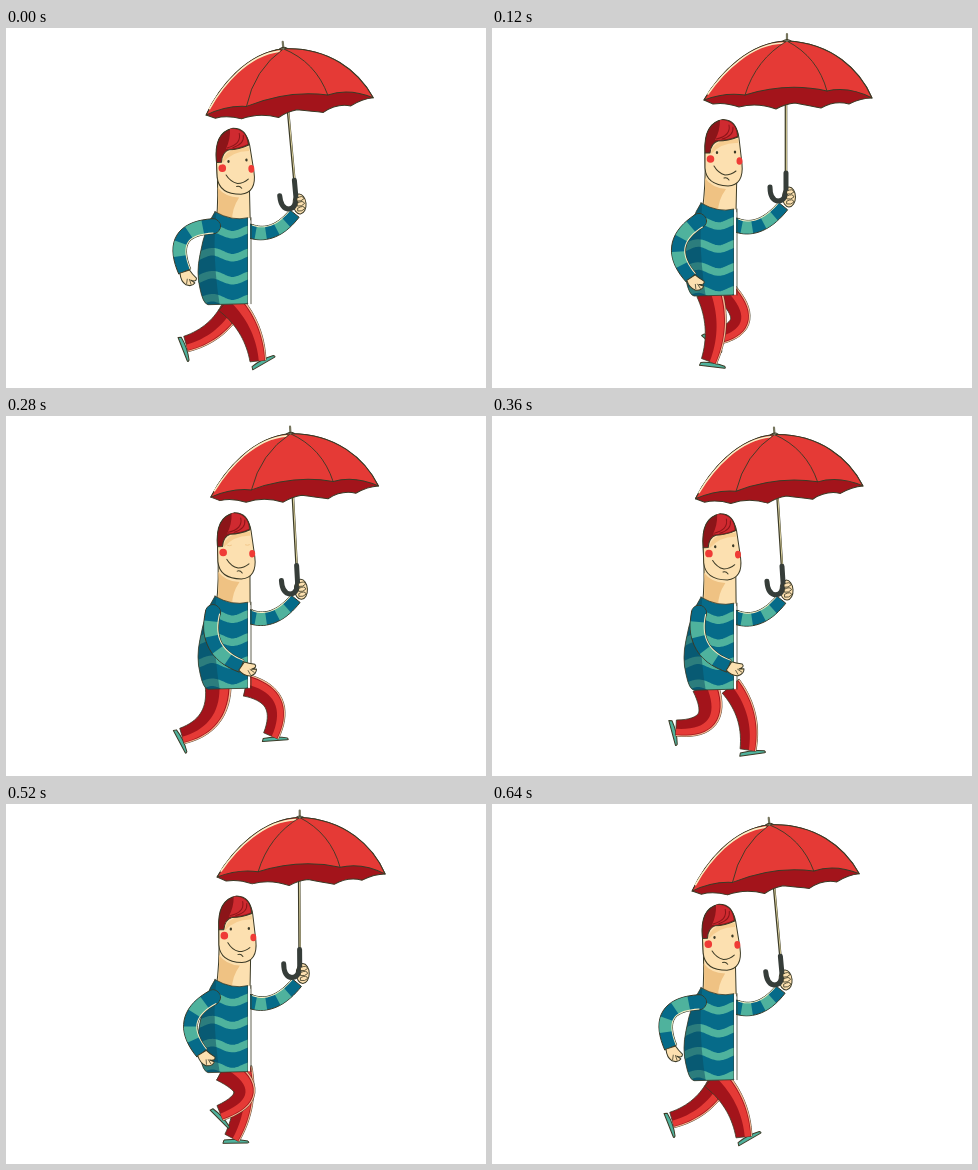
An HTML page with a canvas that plays this animation: 480x360 px, repeating every 680 ms.

```html
<!DOCTYPE html>
<html lang="en">
<head>
<meta charset="utf-8">
<title>Walk with umbrella</title>
<style>
html, body { margin: 0; width: 100%; height: 100%; overflow: hidden; background: #fff; }
canvas { display: block; }
</style>
</head>
<body>
<canvas id="stage" width="480" height="360"></canvas>
<script>
const ctx = document.getElementById('stage').getContext('2d');
const LOOP = 680, STEP = 40, DEG = Math.PI / 180;
const C = {
  line: '#3b3a26', cream: '#fbeec4', red: '#e53a36', deep: '#a3141b', wine: '#8c1519',
  blue: '#066b89', navy: '#0b4a5e', teal: '#4fb29d', skin: '#fce0b0', tan: '#efc283', hook: '#363d39'
};

// Walk phase: two steps per loop, 0 and 1 are the landings
const PACE = [[0, -.06], [80, .35], [200, .65], [280, .88], [360, 1], [520, 1.35], [640, 1.94], [LOOP, 1.94]];
// One stride shared by both legs: phase, ankle x, y, foot angle
const STRIDE = [
  [0, 256, 334, -8], [.35, 226, 334, 0], [.65, 199, 332, 20], [.88, 176, 320, 62], [1, 184, 312, 75],
  [1.35, 214, 309, 45], [1.65, 231, 311, 33], [1.88, 265, 320, -4], [1.94, 252, 333, -30], [2, 256, 334, -8]
];
// Free arm: phase, wrist x, y
const SWING = [[0, 177, 243], [.35, 189, 249], [.65, 219, 251], [.9, 237, 250], [1, 237, 250], [1.35, 196, 249], [2, 177, 243]];

function along(keys, t) {
  let i = 1;
  while (keys[i][0] < t) i++;
  const a = keys[i - 1], b = keys[i], u = (t - a[0]) / (b[0] - a[0]);
  return a.slice(1).map((v, k) => v + (b[k + 1] - v) * u);
}

const cycle = s => (s + 2) % 2;

function paint(d, fill, stroke, width = 1) {
  const p = typeof d === 'string' ? new Path2D(d) : d;
  if (fill) { ctx.fillStyle = fill; ctx.fill(p); }
  if (stroke) { ctx.strokeStyle = stroke; ctx.lineWidth = width; ctx.stroke(p); }
}

function dot(x, y, rx, ry, fill, stroke) {
  const p = new Path2D();
  p.ellipse(x, y, rx, ry, 0, 0, 7);
  paint(p, fill, stroke);
}

function group(x, y, angle, draw) {
  ctx.save();
  ctx.translate(x, y);
  ctx.rotate(angle * DEG);
  draw();
  ctx.restore();
}

// Joint of a limb of fixed length: the closer its ends, the further it bends
function joint(x0, y0, x1, y1, side) {
  const dx = x1 - x0, dy = y1 - y0, d = Math.hypot(dx, dy);
  const k = side * Math.max(13, .9 * Math.sqrt(Math.max(0, 68 ** 2 - d * d))) / d;
  return [(x0 + x1) / 2 + dy * k, (y0 + y1) / 2 - dx * k];
}

// Tapered curve; returns a builder for bands across (a..b) and along (from..to)
function limb(x0, y0, cx, cy, x1, y1, w0, w1) {
  const point = (u, s) => {
    const v = 1 - u;
    const dx = v * (cx - x0) + u * (x1 - cx), dy = v * (cy - y0) + u * (y1 - cy);
    const k = s * (w0 + (w1 - w0) * u) / Math.hypot(dx, dy);
    return [v * v * x0 + 2 * v * u * cx + u * u * x1 + dy * k,
            v * v * y0 + 2 * v * u * cy + u * u * y1 - dx * k];
  };
  return (a = -1, b = 1, from = 0, to = 1) => {
    const p = new Path2D(), n = 18;
    for (let i = 0; i <= n; i++) p.lineTo(...point(from + (to - from) * i / n, a));
    for (let i = n; i >= 0; i--) p.lineTo(...point(from + (to - from) * i / n, b));
    p.closePath();
    return p;
  };
}

function leg(phase, hip, hipY, w) {
  const [x, y, foot] = along(STRIDE, cycle(phase));
  const hipX = hip + .12 * (x - 225);
  group(x, y, foot, () => paint('M-9 5L-8 2Q4 0 16 3Q18 5 16 5Z', C.teal, C.line));
  const band = limb(hipX, hipY, ...joint(hipX, hipY, x, y, 1), x, y, w, 8);
  paint(band(), C.deep, C.line, .8);
  paint(band(.1, .8), C.red);
  paint(band(.88, 1), '#f3b793');
}

function sleeve(x0, y0, cx, cy, x1, y1, w0, w1) {
  const band = limb(x0, y0, cx, cy, x1, y1, w0, w1);
  dot(x0, y0, w0, w0, C.blue, C.line);
  paint(band(), C.blue, C.line);
  dot(x0, y0, w0 - .5, w0 - .5, C.blue);
  for (const u of [.12, .58]) paint(band(-.95, .95, u, u + .22), C.teal);
  paint(band(.84, .98), C.cream);
}

function nearArm(phase, b) {
  const [x, y] = along(SWING, cycle(phase)), sy = 193 + b * .6;
  const [cx, cy] = joint(207, sy, x, y, -1);
  const angle = Math.atan2(y - cy, x - cx) / DEG - 90;
  sleeve(207, sy, cx, cy, x, y, 7.5, 6.5);
  group(x, y, angle * .8, () => {
    paint('M-5 0Q-7 8 -3 13Q2 17 6 14L3 10Q8 14 9 10Q6 4 5 0Z', C.skin, C.line);
    paint('M-2 12L0 8M2 14L2 9', null, C.line, .7);
  });
}

function torso() {
  const shape = new Path2D('M209 175Q226 185 242 181L242 267L202 268Q197 267 194 252Q190 236 194 218Q199 190 209 175Z');
  ctx.save();
  ctx.clip(shape);
  ctx.fillStyle = C.blue;
  ctx.fillRect(185, 170, 62, 102);
  for (let y = 195; y < 270; y += 23) {
    const p = new Path2D();
    for (let x = 186; x <= 246; x += 2) p.lineTo(x, y - 3 * Math.sin((x - 196) / 6.5));
    paint(p, null, C.teal, 7.5);
  }
  ctx.globalAlpha = .5;
  paint('M185 170L211 170Q205 215 214 270L185 270Z', C.navy);
  ctx.restore();
  paint(shape, null, C.line, .8);
  paint('M243 182L243 266', null, '#fff', 2);
  paint('M245 181L245 267', null, C.line, .8);
}

function head(open) {
  paint('M213 125Q214 160 210 184L244 184L245 140Z', C.skin, C.line);
  paint('M213 150Q220 160 234 161Q226 172 226 184L211 184Q214 168 213 150Z', C.tan);
  paint('M213 122Q213 94 231 92Q245 94 247 110L250 136Q252 157 236 158Q214 157 213 140Z', C.skin, C.line);
  paint('M219 124Q222 114 234 112L246 111L246 115Q230 114 219 126Z', '#f6cd90');
  paint('M213 125Q211 95 231 91.5Q245 92 246 109Q236 113 226 113Q219 115 218 125Z', C.wine, C.line);
  paint('M228 92Q244 92 245 108Q236 112 223 112Q228 103 228 92Z', '#cf2a30');
  paint('M224 111Q239 108 237 97M230 111Q242 108 241 99', null, C.wine);
  dot(218.5, 131, 3.8, 3.8, '#ef3b36');
  dot(247.5, 133, 3, 3.8, '#ef3b36');
  if (open) {
    dot(225, 124.5, 1.2, 1.5, C.line);
    dot(243, 124, 1.2, 1.5, C.line);
  } else {
    paint('M223 124Q225 125 227 124M241 124Q243 125 245 124', null, C.tan, .8);
  }
  paint('M222 138Q226 145 233 147Q239 147 244 143M232 150Q235 149 237 152', null, C.line);
}

function umbrella() {
  dot(2, 163, 6.5, 10, C.skin, C.line);
  paint('M-1 54L-1 140', null, C.line, 2.6);
  paint('M-.6 54L-.6 140', null, '#d9cf9c', 1);
  paint('M-1 139L-1 157Q-2 167 -9 167Q-17 166 -17 153', null, C.hook, 5);
  for (let y = 157; y < 170; y += 5) paint(`M0 ${y}Q6 ${y - 3} 7 ${y + 1}Q4 ${y + 4} 0 ${y + 3}Z`, C.skin, C.line, .8);

  const dome = 'M-83 66C-68 40 -38 8 0 7C45 9 73 36 85 64';
  paint(dome + 'Q74 64 62 70Q48 66 34 74Q24 72 8 69Q-2 70 -11 75Q-30 68 -48 73Q-62 68 -74 70Z', C.deep, C.line);
  paint(dome + 'Q62 52 40 57Q0 48 -42 61Q-62 58 -83 66Z', C.red, C.line);
  paint('M-79 60C-63 37 -36 10 -4 9', null, C.cream, 1.6);
  paint('M0 7Q-31 25 -42 61M0 7Q31 23 40 57', null, C.line, .9);
  paint('M0 0L0 7', null, '#77765e', 2.2);
  paint('M-4 7Q0 4 4 7', null, C.line, 1);
}

function draw(t) {
  const [s] = along(PACE, t);
  // Low on each landing, a little lower on the first
  const b = 3.6 + 4 * Math.cos(2 * Math.PI * s) + 1.4 * Math.cos(Math.PI * s);
  const x = 295 - 2.1 * b, y = 6 + .9 * b, angle = -.6 * b;
  const sin = Math.sin(angle * DEG), cos = Math.cos(angle * DEG);
  const wrist = [x - 4 * cos - 172 * sin, y - 4 * sin + 172 * cos];

  ctx.fillStyle = '#fff';
  ctx.fillRect(0, 0, 480, 360);
  ctx.lineCap = ctx.lineJoin = 'round';

  leg(s + 1, 235, 264 + b, 11);
  leg(s, 218, 264 + b, 13);
  sleeve(244, 197 + b * .7, 268, 206 + b * .6, ...wrist, 7, 6);
  group(x, y, angle, umbrella);
  group(228, 180 + b, -.3 * b, () => {
    ctx.translate(-228, -180);
    head(t < 160 || t >= 320);
  });
  group(0, b, 0, torso);
  nearArm(s, b);
}

function tick() {
  draw(Math.floor(performance.now() % LOOP / STEP) * STEP);
  requestAnimationFrame(tick);
}
tick();
</script>
</body>
</html>
```
